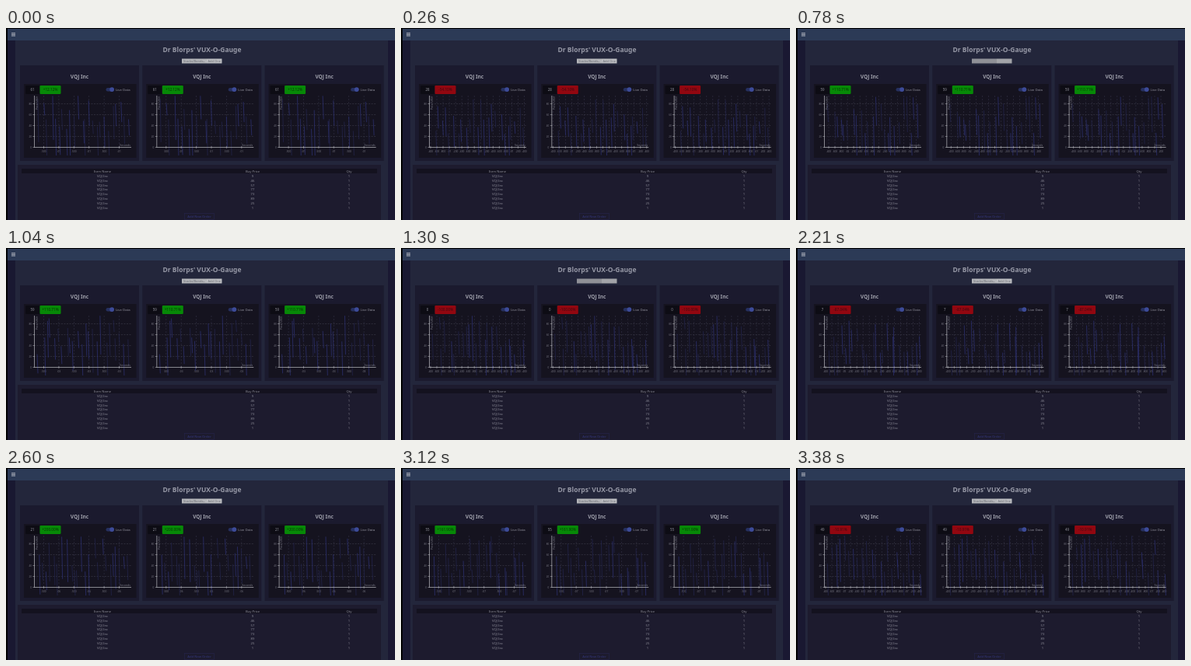
An HTML page with a canvas for the animation above (3.64 s loop, 500x247 px).

```html
<!DOCTYPE html>
<html lang="en">
<head>
<meta charset="utf-8">
<title>Random price dashboard</title>
<style>
html, body { margin: 0; width: 100%; height: 100%; overflow: hidden; background: #000; }
canvas { display: block; width: 500px; height: 247px; }
</style>
</head>
<body>
<canvas id="stage"></canvas>
<script>
const W = 500, H = 247, LOOP = 3640, CYCLE = 520;
const canvas = document.getElementById('stage');
const ctx = canvas.getContext('2d');
const dpr = window.devicePixelRatio || 1;
canvas.width = Math.round(W * dpr);
canvas.height = Math.round(H * dpr);

const SANS = '"Noto Sans", "Open Sans", sans-serif';
const TITLE = "Dr Blorps' VUX-O-Gauge";
const COMPANY = 'VQJ Inc';
const PRICES = [9, 46, 57, 77, 73, 89, 25, 1];

// Per cycle: the early quote, then the settled quote.
const QUOTES = [
  [[61, '+12.12%'], [28, '-54.10%']],
  [[28, '-54.10%'], [59, '+110.71%']],
  [[59, '+110.71%'], [0, '-100.00%']],
  [[66, '+100.00%'], [54, '-18.18%']],
  [[7, '-87.04%'], [7, '-87.04%']],
  [[21, '+200.00%'], [55, '+161.90%']],
  [[55, '+161.90%'], [49, '-10.91%']]
];

function rng(seed) {
  let s = seed >>> 0;
  return () => {
    s = (s + 0x6d2b79f5) >>> 0;
    let t = Math.imul(s ^ (s >>> 15), s | 1);
    t ^= t + Math.imul(t ^ (t >>> 7), t | 61);
    return ((t ^ (t >>> 14)) >>> 0) / 4294967296;
  };
}

function rect(x, y, w, h, color) {
  ctx.fillStyle = color;
  ctx.fillRect(x, y, w, h);
}

function pill(x, y, w, h, r, color) {
  ctx.fillStyle = color;
  ctx.beginPath();
  ctx.roundRect(x, y, w, h, r);
  ctx.fill();
}

function line(x1, y1, x2, y2, color, width = 1, dash = []) {
  ctx.strokeStyle = color;
  ctx.lineWidth = width;
  ctx.setLineDash(dash);
  ctx.beginPath();
  ctx.moveTo(x1, y1);
  ctx.lineTo(x2, y2);
  ctx.stroke();
  ctx.setLineDash([]);
}

function text(str, x, y, size, color, align = 'center', weight = 400) {
  ctx.font = `${weight} ${size}px ${SANS}`;
  ctx.textAlign = align;
  ctx.textBaseline = 'alphabetic';
  ctx.fillStyle = color;
  ctx.fillText(str, x, y);
}

function drawPage(cycle, step) {
  rect(0, 0, W, H, '#000');
  rect(2, 16, 10, 231, '#191831');
  rect(12, 16, 479, 231, '#23263b');
  rect(491, 16, 9, 231, '#1a1832');
  rect(2, 1, 498, 15, '#2c3a56');
  for (let i = 0; i < 3; i++) rect(7, 6.2 + i * 1.7, 5, 0.9, '#b6bac4');

  text(TITLE, 252, 31, 8.5, '#9698a6', 'center', 700);

  const blank = step === 2 && (cycle === 1 || cycle === 2);
  rect(226, 39.5, 32, 6, blank ? '#8f9097' : '#b4b5b9');
  rect(258, 39.5, 19.5, 6, blank ? '#a2a3a8' : '#bcbdc1');
  if (!blank) {
    text('Stocks/Bonds', 228, 44, 4, '#686a73', 'left');
    text('⌄', 254.5, 43.5, 4, '#686a73');
    text('Add One', 267.7, 44, 4, '#686a73');
  }
}

function drawTable() {
  rect(15, 176, 467, 71, '#1d1b2e');
  rect(20, 181, 457, 6, '#14121f');
  const ink = '#8b8b97';
  text('Item Name', 124, 185.8, 4.2, ink);
  text('Buy Price', 317, 185.8, 4.2, ink);
  text('Qty', 441, 185.8, 4.2, ink);
  PRICES.forEach((p, i) => {
    const y = 191.9 + i * 5.85;
    text(COMPANY, 124, y, 4.2, ink);
    text(p, 317, y, 4.2, ink);
    text('1', 441, y, 4.2, ink);
  });
  ctx.strokeStyle = '#242348';
  ctx.lineWidth = 0.7;
  ctx.strokeRect(229.5, 238.5, 38, 8);
  text('Add New Order', 248.5, 244, 4.2, '#34387c');
}

// Time ticks: every 500 ms in the early view, every 200 ms once settled.
function timeTicks(cycle, step) {
  const early = step === 0;
  const gap = early ? 19.4 : 8.03;
  const start = early ? 48.5 : (cycle % 2 ? 42 : 38);
  const ticks = [];
  for (let i = 0, x = start; x < 160; i++, x = start + i * gap) {
    const n = early ? (1 - i % 2) * 500 : ((i + 2) % 5) * 200;
    ticks.push([x, n ? '.' + n : ':0' + (cycle + 1)]);
  }
  return ticks;
}

function drawChart(cycle, step) {
  const ink = '#777783';
  for (const [x, label] of timeTicks(cycle, step)) {
    line(x, 87, x, 153, '#2e2d3f', 0.7, [2, 2]);
    line(x, 152, x, 155, '#aaaab0', 0.6);
    text(label, x, 159.8, 3.2, ink);
  }
  for (let v = 0; v < 5; v++) {
    const y = 153.5 - v * 14;
    if (v) line(36, y, 161, y, '#33323f', 0.8, [2, 1.5]);
    line(34.5, y, 37, y, '#aaaab0', 0.6);
    text(v * 20, 33, y + 1, 3, ink, 'right');
  }

  const rand = rng(911 + cycle * 37 + step * 101);
  const count = 24;
  for (let i = 0; i < count; i++) {
    const x = 40 + (i + rand()) * 120 / count;
    const top = 87 + rand() * 50;
    const end = Math.min(164, top + 15 + rand() * 45);
    const tone = rand();
    line(x, top, x + 1, end, tone > 0.5 ? '#2b2f6c' : '#22244a', 0.8);
  }

  line(36.5, 87, 36.5, 154, '#a6a6ad', 0.8);
  line(36.5, 153.5, 161, 153.5, '#a6a6ad', 0.8);
  text('Seconds', 160, 151.8, 3.6, ink, 'right');
  ctx.save();
  ctx.translate(40.5, 88);
  ctx.rotate(-Math.PI / 2);
  text('Price (USD)', 0, 0, 3.3, ink, 'right');
  ctx.restore();
}

function drawCard(x, cycle, step) {
  const [value, change] = QUOTES[cycle][step === 2 ? 1 : 0];
  const up = change[0] === '+';
  ctx.save();
  ctx.translate(x, 0);
  rect(18, 48, 153, 123, '#1b1a2e');
  text(COMPANY, 94.5, 64.6, 6.5, '#a0a1ac', 'center', 700);
  rect(23, 72, 144.5, 95, '#15131f');
  pill(25, 74, 18, 11, 1, '#0d0c14');
  text(value, 34, 81.3, 4.4, '#92929c');
  pill(43.5, 74, 27, 11, 1.2, up ? '#078907' : '#920710');
  text(change, 57, 81.3, 4.7, up ? '#033c03' : '#420810');
  pill(128.5, 77, 10.5, 4.4, 2.2, '#26305f');
  pill(133.2, 76.2, 5.8, 5.8, 2.9, '#3d4b98');
  text('Live Data', 141, 81, 4.3, '#92929e', 'left');
  drawChart(cycle, step);
  ctx.restore();
}

function render(ms) {
  const t = ms % LOOP;
  const cycle = Math.floor(t / CYCLE);
  const step = Math.min(2, Math.floor((t % CYCLE) / 130));
  ctx.setTransform(dpr, 0, 0, dpr, 0, 0);
  drawPage(cycle, step);
  for (let i = 0; i < 3; i++) drawCard(i * 157.3, cycle, step);
  drawTable();
}

const began = performance.now();
function tick() {
  render(performance.now() - began);
  requestAnimationFrame(tick);
}
tick();
</script>
</body>
</html>
```
